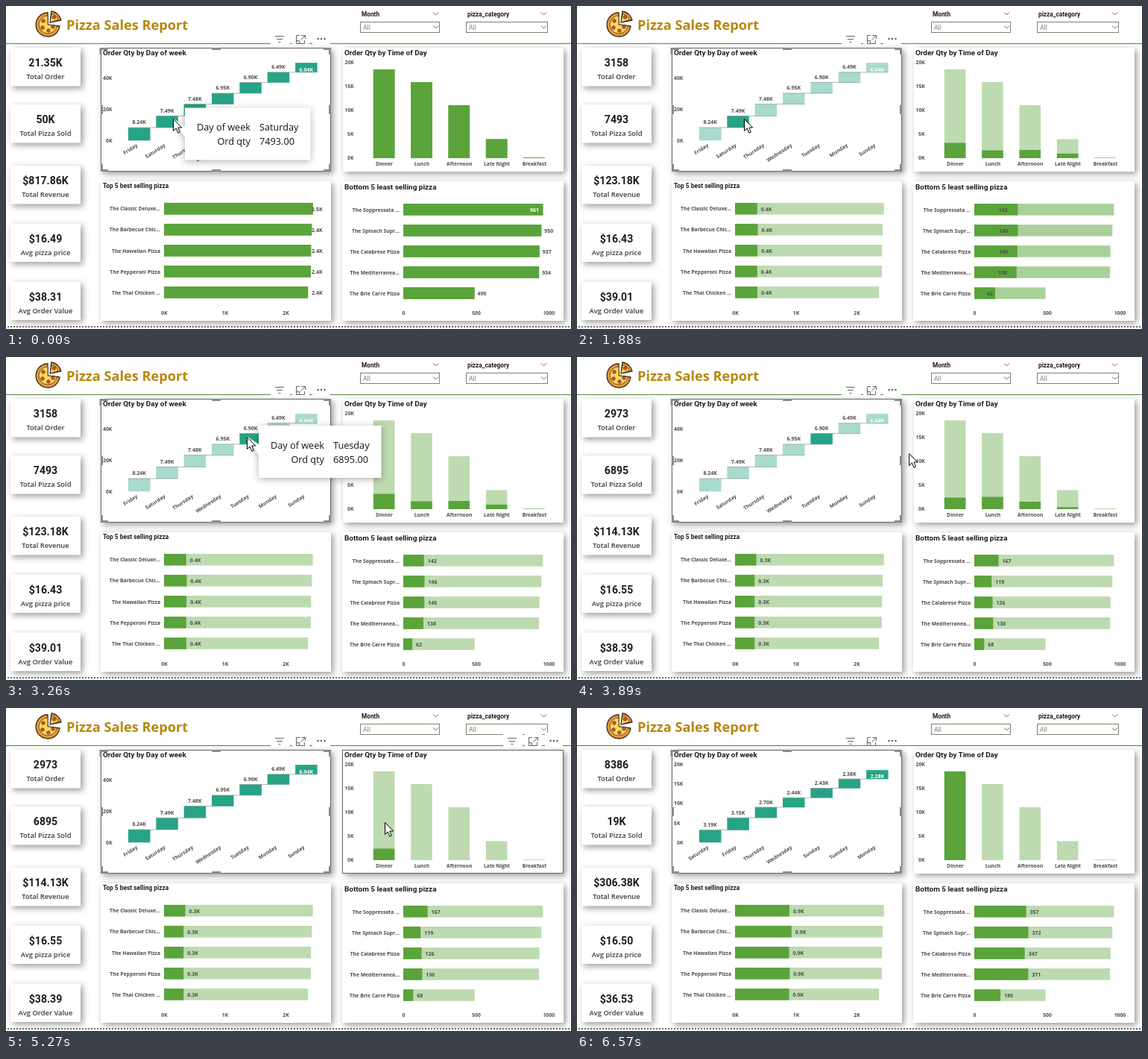
Write an HTML page that moves like this. It is 758 px wide and 433 px high and loops after 6.75 s.

```html
<!DOCTYPE html>
<html lang="en">
<head>
<meta charset="utf-8">
<title>Pizza Sales Report</title>
<style>
html, body { margin: 0; width: 100%; height: 100%; overflow: hidden; background: #fff; }
svg { display: block; width: 758px; height: 433px; }
text { font-family: "Open Sans", "Noto Sans", sans-serif; fill: #4e4c4a; font-weight: 700; white-space: pre; }
.din { font-family: Roboto, Inter, sans-serif; fill: #1d1d1d; }
.card { font-weight: 600; fill: #3c3a38; }
.title { fill: #b8860b; }
.thin { font-weight: 400; fill: #151515; }
.grey { font-weight: 400; fill: #777; }
.white { fill: #fff; }
.panel { fill: #fff; filter: drop-shadow(3px 3px 4px rgba(0,0,0,.4)); }
.tip { fill: #fff; filter: drop-shadow(0 2px 5px rgba(0,0,0,.3)); }
.line { fill: none; stroke: #666; }
.handle { fill: none; stroke: #8a8a8a; stroke-width: 3; }
</style>
</head>
<body>
<svg id="stage" viewBox="0 0 758 433"></svg>
<script>
const LOOP = 6750, GREEN = '#5aa43b', TEAL = '#27a386', RULE = '#4c8a3f';
const stage = document.getElementById('stage');

function el(tag, attrs, parent = stage) {
  const node = document.createElementNS('http://www.w3.org/2000/svg', tag);
  set(node, attrs);
  parent.append(node);
  return node;
}
function set(node, attrs) {
  for (const k in attrs) node.setAttribute(k, attrs[k]);
}
const rect = (x, y, width, height, attrs, parent) => el('rect', { x, y, width, height, ...attrs }, parent);
const path = (d, attrs, parent) => el('path', { d, ...attrs }, parent);
// cy is the middle of the capitals
function label(str, x, cy, size = 6.8, cls = '', anchor = 'start', parent = stage) {
  const node = el('text', { x, y: cy + size * .36, 'font-size': size, class: cls, 'text-anchor': anchor }, parent);
  node.textContent = str;
  return node;
}
const write = (node, str) => { if (node.textContent !== str) node.textContent = str; };
const show = (node, on) => node.setAttribute('visibility', on ? 'visible' : 'hidden');

const clamp = x => Math.min(1, Math.max(0, x));
const ease = x => (x = clamp(x)) < .5 ? 4 * x ** 3 : 1 - 4 * (1 - x) ** 3;
// each step is [start, duration, value]
function seq(t, v, steps) {
  for (const [start, dur, to] of steps) v += (to - v) * ease((t - start) / dur);
  return v;
}
const pick = (t, values, times) => values[times.filter(s => t >= s).length];

// ---------- header ----------
function pizza() {
  const g = el('g', { stroke: '#3a2a1c', 'stroke-width': 1.3, 'stroke-linejoin': 'round' });
  path('M56 25V9A16 16 0 1 0 72 27Z', { fill: '#e79a35' }, g);
  path('M56 25V13A12 12 0 1 0 68 26.5Z', { fill: '#ffd65a', 'stroke-width': .7 }, g);
  path('M59 22L61 7A17 17 0 0 1 74 19Z', { fill: '#e79a35' }, g);
  path('M59 22L61.5 10.5A13 13 0 0 1 70 18.5Z', { fill: '#ffd65a', 'stroke-width': .7 }, g);
  for (const [cx, cy] of [[50, 20], [49, 29], [57, 33], [63, 28], [64.5, 15]])
    el('circle', { cx, cy, r: 2.3, fill: '#d4552e', 'stroke-width': .6 }, g);
}
function slicer(name, x, w) {
  label(name, x + 2, 11.5, 8.3, 'din');
  rect(x + .5, 21.5, w - 1, 14, { fill: '#fff', stroke: '#77836f' });
  label('All', x + 4, 29, 8.8, 'grey');
  for (const y of [8.5, 26.5]) path(`M${x + w - 9} ${y}l3.5 3.5l3.5 -3.5`, { class: 'line', stroke: '#555' });
}
pizza();
label('Pizza Sales Report', 81, 25, 18.2, 'title');
slicer('Month', 475, 107);
slicer('pizza_category', 617, 110);
rect(0, 50, 758, 1, { fill: RULE });

// ---------- cards ----------
const CARD_TIMES = [1640, 3600, 5850];
const cards = [
  ['Total Order', 56, ['21.35K', '3158', '2973', '8386'], [1640, 3600, 5470]],
  ['Total Pizza Sold', 132, ['50K', '7493', '6895', '19K'], [1140, 3600, 5850]],
  ['Total Revenue', 214, ['$817.86K', '$123.18K', '$114.13K', '$306.38K'], CARD_TIMES],
  ['Avg pizza price', 291.5, ['$16.49', '$16.43', '$16.55', '$16.50'], CARD_TIMES],
  ['Avg Order Value', 369.5, ['$38.31', '$39.01', '$38.39', '$36.53'], CARD_TIMES]
].map(([name, y, values, times]) => {
  rect(6, y, 94, 51.5, { class: 'panel' });
  label(name, 53, y + 39, 9.4, 'card', 'middle');
  return { values, times, node: label('', 53, y + 20.3, 14.1, 'din', 'middle') };
});

// ---------- panels ----------
for (const [x, y, w, h] of [[127, 56, 309, 166], [452, 56, 296, 166], [127, 235, 309, 187], [451, 235, 297, 187]])
  rect(x, y, w, h, { class: 'panel' });
label('Order Qty by Day of week', 130, 62.5, 9.9, 'din');
label('Order Qty by Time of Day', 454, 62.5, 9.9, 'din');
label('Top 5 best selling pizza', 130, 240.5, 8.4, 'din');
label('Bottom 5 least selling pizza', 454, 242, 9.95, 'din');

// ---------- waterfall ----------
const BASE = 180.3;
const week = {
  days: ['Friday', 'Saturday', 'Thursday', 'Wednesday', 'Tuesday', 'Monday', 'Sunday'],
  qty: [8.24, 7.49, 7.48, 6.95, 6.9, 6.49, 6.04], scale: 2.1
};
const dinner = {
  days: ['Saturday', 'Friday', 'Thursday', 'Wednesday', 'Sunday', 'Tuesday', 'Monday'],
  qty: [3.19, 3.15, 2.7, 2.44, 2.43, 2.38, 2.28], scale: 5.23
};
const axes = [[0, 20, 40], [0, 5, 10, 15, 20]].map((ticks, i) => {
  const g = el('g', {});
  for (const k of ticks) label(k + 'K', k ? 130 : 134, BASE - k * [2.1, 5.23][i], 6.8, '', 'start', g);
  return g;
});
const steps = week.days.map((_, i) => {
  const x = 164 + i * 37.35, last = i === 6;
  const bar = rect(x, 0, 29.5, 0, { fill: TEAL });
  const tag = label('', x + 14.7, 0, 7, last ? 'white' : '', 'middle');
  const day = label('', 0, 0, 6.8, '', 'end');
  set(day, { x: 0, y: 0, transform: `translate(${x + 13} 188) rotate(-33)` });
  const link = last ? null : rect(x, 0, 66.9, .7, { fill: '#8d9a97' });
  return { bar, tag, day, link, last };
});

function drawWeek(t) {
  const swap = t >= 5850, data = swap ? dinner : week;
  const k = ease((t - 5850) / 320);
  const chosen = t < 1140 || t >= 5270 ? -1 : t < 3260 ? 1 : 4;
  const dim = seq(t, 1, [[1140, 160, .4]]);
  show(axes[0], !swap);
  show(axes[1], swap);
  let y = BASE;
  steps.forEach((s, i) => {
    const a = week.qty[i] * week.scale, b = dinner.qty[i] * dinner.scale;
    const h = a + (b - a) * k;
    y -= h;
    set(s.bar, { y, height: h, 'fill-opacity': chosen < 0 || i === chosen ? 1 : dim });
    s.tag.setAttribute('y', (s.last ? y + h / 2 + 2.5 : y - 7) + 2.5);
    write(s.tag, data.qty[i].toFixed(2) + 'K');
    write(s.day, data.days[i]);
    if (s.link) s.link.setAttribute('y', y - .35);
  });
}

// ---------- time of day ----------
for (let k = 0; k <= 20; k += 5) label(k + 'K', k > 9 ? 454.5 : 458, 204 - k * 6.43, 6.8);
const meals = [
  ['Dinner', 119, 20.5, 15.5],
  ['Lunch', 102, 10.5, 16.5],
  ['Afternoon', 71, 11, 10],
  ['Late Night', 25.5, 6.2, 2.7],
  ['Breakfast', 1, .3, .1]
].map(([name, full, sat, tue], i) => {
  const x = 492.8 + i * 50.35;
  label(name, x + 14.7, 211.5, 6.7, '', 'middle');
  return {
    full, sat, tue, first: !i,
    pale: rect(x, 204 - full, 28.6, full, { fill: GREEN }),
    dark: rect(x, 204, 28.6, 0, { fill: GREEN })
  };
});

function drawMeals(t) {
  const alpha = seq(t, 1, [[1620, 250, .4]]);
  for (const m of meals) {
    let h = seq(t, m.full, [[1620, 250, m.sat], [3580, 290, m.tue]]);
    if (m.first) h = seq(t, h, [[5460, 190, m.full]]);
    else if (t >= 5270) h = 0;
    m.pale.setAttribute('fill-opacity', alpha);
    set(m.dark, { y: 204 - h, height: h });
  }
}

// ---------- bar rows ----------
function rows(list, left, scale, top, height, nameX) {
  return list.map(([name, ...v], i) => {
    const cy = top + i * 28.05, y = cy - height / 2;
    label(name, nameX, cy + .3, 6.8, '', 'end');
    return {
      w: v.map(q => q * scale), v, left,
      pale: rect(left, y, v[0] * scale, height, { fill: GREEN }),
      dark: rect(left, y, 0, height, { fill: GREEN }),
      tag: label('', left, cy + .3, 7)
    };
  });
}
const best = rows([
  ['The Classic Deluxe...', 2.45, .365, .35, .895],
  ['The Barbecue Chic...', 2.432, .375, .322, .93],
  ['The Hawaiian Pizza', 2.42, .37, .322, .89],
  ['The Pepperoni Pizza', 2.416, .365, .322, .9],
  ['The Thai Chicken ...', 2.37, .368, .322, .89]
], 212, 81.5, 271.7, 15.6, 207);
const least = rows([
  ['The Soppressata ...', 961, 142, 167, 357],
  ['The Spinach Supr...', 950, 146, 119, 372],
  ['The Calabrese Pizza', 937, 145, 126, 347],
  ['The Mediterranea...', 934, 138, 130, 371],
  ['The Brie Carre Pizza', 490, 62, 68, 180]
], 533, .195, 272.8, 15.6, 528);
[0, 1, 2].forEach(i => {
  label(i + 'K', 212.5 + i * 81.5, 411.5, 6.8, '', 'middle');
  label(i * 500 + '', 533.5 + i * 97.5, 411.5, 6.8, '', 'middle');
});

function drawRow(r, t, times, durs) {
  const plan = times.map((s, i) => [s, durs[i], r.w[i + 1]]);
  r.pale.setAttribute('fill-opacity', seq(t, 1, [[times[0], durs[0], .4]]));
  r.dark.setAttribute('width', seq(t, r.w[0], plan));
  return plan;
}
function drawBest(t) {
  const times = [1620, 3570, 5460];
  for (const r of best) {
    const plan = drawRow(r, t, times, [250, 300, 190]);
    plan[0][0] = 1140;
    plan[0][1] = 340;
    r.tag.setAttribute('x', seq(t, 198, plan.map(([s, d, w]) => [s, d, w + 5])) + r.left);
    write(r.tag, pick(t, r.v, [1140, 3570, 5460]).toFixed(1) + 'K');
  }
}
function drawLeast(t) {
  const times = [1690, 3570, 5850];
  least.forEach((r, i) => {
    const plan = drawRow(r, t, times, [300, 300, 300]);
    const inside = !i && t < 1640;
    plan[0][0] = 1630;
    plan[0][1] = 120;
    const from = i ? r.w[0] + 4 : 170;
    r.tag.setAttribute('x', seq(t, from, plan.map(([s, d, w]) => [s, d, w + 5])) + r.left);
    r.tag.setAttribute('class', inside ? 'white' : '');
    write(r.tag, '' + pick(t, r.v, [1640, 3570, 5850]));
  });
}

// ---------- selection frame and toolbars ----------
rect(127.5, 56.5, 308, 165, { class: 'line', stroke: '#505050' });
path('M127 65V57.5H137M276 57.5H288M426 57.5H434.5V65M434.5 133V145M434.5 212V220.5H426M288 220.5H276M137 220.5H128.5V212M128.5 145V133', { class: 'handle' });

function toolbar(x) {
  const g = el('g', { transform: `translate(${x} 0)` });
  for (const [dx, w] of [[0, 26], [29, 23], [56, 24]]) rect(dx, 33, w, 19, { fill: '#fff' }, g);
  path('M6 40.5H18M8 44.5H16M10.5 48.5H13.5', { class: 'line' }, g);
  path('M39 39.5H34.5V50.5H45.5V46M41.5 39.5H46.5V44M46 40L40.5 45.5M34.5 46.5H38.5V50.5', { class: 'line' }, g);
  for (const cx of [63.5, 68, 72.5]) el('circle', { cx, cy: 44, r: 1.2, fill: '#555' }, g);
  return g;
}
toolbar(355);
const cover = el('g', {});
rect(355, 50, 80, 1, { fill: RULE }, cover);
rect(355, 51, 80, 1.5, { fill: '#fff' }, cover);
const hover = el('g', {});
hover.append(toolbar(667));
rect(451.5, 56.5, 296, 165, { class: 'line', stroke: '#222' }, hover);

path('M2 430H758', { stroke: '#6a6a6a', 'stroke-width': 2, 'stroke-dasharray': '2 2' });

// ---------- tooltips ----------
function tooltip(x, y, w, day, qty) {
  const g = el('g', {});
  path(`M${x} ${y}h${w}v70h${-w}v-30l-16 -26l16 11z`, { class: 'tip' }, g);
  label('Day of week', x + 88, y + 26, 12.7, 'thin', 'end', g);
  label('Ord qty', x + 88, y + 45, 12.7, 'thin', 'end', g);
  label(day, x + 100, y + 26, 12.7, 'thin', 'start', g);
  label(qty, x + 100, y + 45, 12.7, 'thin', 'start', g);
  return g;
}
const tipSat = tooltip(240, 136.5, 168.5, 'Saturday', '7493.00');
const tipTue = tooltip(339, 92, 164.5, 'Tuesday', '6895.00');

// ---------- pointer ----------
const pointer = el('g', {});
const press = el('circle', { r: 12, fill: '#ffff00', 'fill-opacity': .4 }, pointer);
path('M.5 .5V16.5L4.2 13L6.8 19.2L9.4 18L6.8 12H11.7Z', { fill: '#fff', stroke: '#000', 'stroke-linejoin': 'round' }, pointer);
const track = [
  [0, 224, 151], [1950, 224, 151], [2290, 302, 125], [2470, 323, 107], [3600, 323, 107],
  [3890, 445, 129], [4230, 505, 152], [4450, 508, 153], [5850, 508, 153], [6300, 545, 440], [LOOP, 545, 440]
];
const clicks = [[460, 620], [2760, 2880], [4500, 4660]];

function drawPointer(t) {
  const i = track.findIndex(p => p[0] > t);
  const [t0, x0, y0] = track[i - 1], [t1, x1, y1] = track[i];
  const k = (t - t0) / (t1 - t0), x = x0 + (x1 - x0) * k, y = y0 + (y1 - y0) * k;
  pointer.setAttribute('transform', `translate(${x} ${y})`);
  show(press, clicks.some(([a, b]) => t >= a && t < b));
  show(hover, x > 452 && y < 222);
}

function draw(t) {
  for (const c of cards) write(c.node, pick(t, c.values, c.times));
  drawWeek(t);
  drawMeals(t);
  drawBest(t);
  drawLeast(t);
  drawPointer(t);
  show(tipSat, t < 1140);
  show(tipTue, t >= 3260 && t < 3580);
  show(cover, t >= 6570);
}

const start = performance.now();
function tick() {
  draw((performance.now() - start) % LOOP);
  requestAnimationFrame(tick);
}
tick();
</script>
</body>
</html>
```
